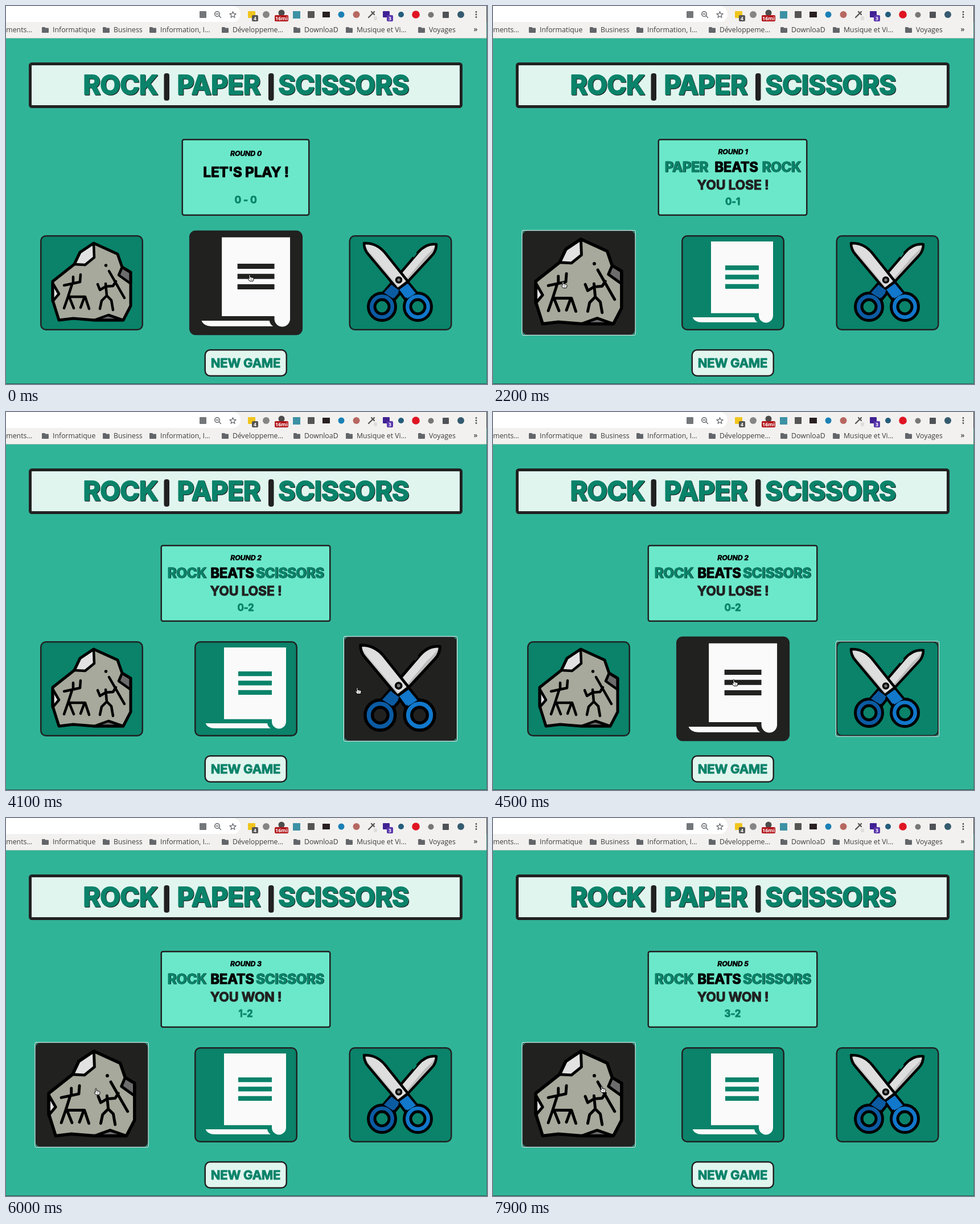
An HTML page with a canvas for the animation above (8 s loop, 845 px wide and 663 px high).

```html
<!DOCTYPE html>
<html lang="en">
<head>
<meta charset="utf-8">
<title>Rock Paper Scissors</title>
<style>
html, body { margin: 0; width: 100%; height: 100%; overflow: hidden; background: #30b498; }
canvas { display: block; }
</style>
</head>
<body>
<canvas id="stage" width="845" height="663"></canvas>
<script>
const ctx = document.getElementById('stage').getContext('2d');
const LOOP = 8000, FADE = 0.2;
const DARK = '#212121', GREEN = '#0a836a', BLACK = '#000', PALE = '#e1f5ef';

// Hover periods of each card, in seconds
const cards = [
  { x: 60, draw: rock, hover: [[1.85, 2.87], [5.285, 6.36], [7.38, 9]] },
  { x: 331, draw: paper, hover: [[-1, 1.64], [2.9, 3.072], [4.27, 5.24], [6.42, 7.22]] },
  { x: 602.5, draw: scissors, hover: [[3.15, 4.17]] }
];
// Pressed card and time of press; the panel follows 0.1 s later
const presses = [[2.1, 0], [3.5, 2], [4.6, 1], [5.6, 0], [6.7, 1], [7.8, 0]];
const panels = [
  { w: 225, round: 0 },
  { w: 263, round: 1, row: ['PAPER', 'BEATS', 'ROCK'], mid: 427.5, end: 'YOU LOSE !', score: '0-1' },
  { w: 299, round: 2, row: ['ROCK', 'BEATS', 'SCISSORS'], mid: 397.5, end: 'YOU LOSE !', score: '0-2' },
  { w: 237, round: 2, row: ['PAPER', 'VS.', 'PAPER'], mid: 421.5, end: 'TIE GAME !', score: '0-2' },
  { w: 299, round: 3, row: ['ROCK', 'BEATS', 'SCISSORS'], mid: 397.5, end: 'YOU WON !', score: '1-2' },
  { w: 263, round: 4, row: ['PAPER', 'BEATS', 'ROCK'], mid: 427.5, end: 'YOU WON !', score: '2-2' },
  { w: 299, round: 5, row: ['ROCK', 'BEATS', 'SCISSORS'], mid: 397.5, end: 'YOU WON !', score: '3-2' }
];
const pointer = [
  [0, 430, 477], [1.5, 430, 477], [1.7, 320, 482], [1.9, 200, 487], [2.1, 125, 489],
  [2.8, 125, 489], [2.9, 260, 484], [3.1, 529, 480], [3.25, 640, 486], [3.5, 619, 489],
  [4.1, 619, 489], [4.3, 500, 480], [4.5, 425, 475], [5.1, 425, 475], [5.2, 340, 478],
  [5.3, 248, 479], [5.5, 160, 480], [6.2, 160, 480], [6.4, 290, 470], [6.6, 415, 459],
  [6.7, 420, 458], [7.1, 420, 458], [7.2, 335, 464], [7.4, 230, 474], [7.6, 193, 476], [8, 193, 476]
];

const clamp = v => Math.max(0, Math.min(1, v));
const mix = (a, b, k) => a + (b - a) * k;

// CSS "ease"
function ease(x) {
  x = clamp(x);
  let lo = 0, hi = 1, u = 0.5;
  for (let i = 0; i < 16; i++) {
    u = (lo + hi) / 2;
    const v = 1 - u;
    if (0.75 * v * v * u + 0.75 * v * u * u + u * u * u < x) lo = u; else hi = u;
  }
  return 0.3 * (1 - u) * (1 - u) * u + 3 * (1 - u) * u * u + u * u * u;
}

function hoverAmount(card, t) {
  return Math.max(...card.hover.map(([a, b]) => ease((t - a) / FADE) * (1 - ease((t - b) / FADE))));
}

function paint(fill, stroke, width) {
  if (fill) { ctx.fillStyle = fill; ctx.fill(); }
  if (stroke) { ctx.strokeStyle = stroke; ctx.lineWidth = width; ctx.stroke(); }
}

function box(x, y, w, h, r, fill, stroke, line = 0) {
  ctx.beginPath();
  ctx.roundRect(x + line / 2, y + line / 2, w - line, h - line, r);
  paint(fill, stroke, line);
}

function disc(x, y, r, fill, stroke, line) {
  ctx.beginPath();
  ctx.arc(x, y, r, 0, 7);
  paint(fill, stroke, line);
}

function shape(d, fill, stroke, line) {
  const p = new Path2D(d);
  if (fill) { ctx.fillStyle = fill; ctx.fill(p); }
  if (stroke) { ctx.strokeStyle = stroke; ctx.lineWidth = line; ctx.stroke(p); }
}

// Bold lettering with rounded corners
function heading(s, x, y, size, color, { align = 'center', shadow = 0, italic = '' } = {}) {
  ctx.font = `${italic} 700 ${size}px Inter, sans-serif`;
  ctx.letterSpacing = `${-0.01 * size}px`;
  ctx.textAlign = align;
  ctx.lineWidth = size * 0.045;
  const put = (c, d) => {
    ctx.fillStyle = ctx.strokeStyle = c;
    ctx.strokeText(s, x + d, y + d);
    ctx.fillText(s, x + d, y + d);
  };
  if (shadow) put(DARK, shadow);
  put(color, 0);
  ctx.letterSpacing = '0px';
}

function label(s, x, y, size = 12.3, color = '#3c3c3c', align = 'left', weight = 400) {
  ctx.font = `${weight} ${size}px "Open Sans", "Noto Sans", sans-serif`;
  ctx.textAlign = align;
  ctx.fillStyle = color;
  ctx.fillText(s, x, y);
}

function browserBar() {
  box(0, 0, 845, 56, 0, '#f2f1ef');
  box(-30, 0, 442, 28, 14, '#fff');
  box(0, 56, 845, 1, 0, '#a3c4b9');

  box(340, 9, 12, 12, 1, '#74777a');
  disc(371, 14, 4.3, null, '#5f6368', 1.4);
  shape('M374 17L377.5 20.5M369 14H373', null, '#5f6368', 1.4);
  ctx.beginPath();
  for (let i = 0; i < 10; i++) {
    const a = i * Math.PI / 5 - Math.PI / 2, r = i % 2 ? 2.6 : 5.8;
    ctx.lineTo(398.5 + r * Math.cos(a), 15.5 + r * Math.sin(a));
  }
  ctx.closePath();
  paint(null, '#5f6368', 1.2);

  box(425, 9, 13, 12, 1, '#f0c51d');
  box(432, 16, 11, 11, 2, '#555');
  label('4', 437.5, 25, 8.5, '#fff', 'center', 700);
  disc(457, 15, 6, '#858585');
  disc(484, 12, 5.5, '#4c4c4c');
  box(472, 16, 24, 11, 2, '#b3161b');
  label('16mi', 484, 24.7, 9, '#fff', 'center', 700);
  box(504, 9, 13, 13, 0, '#3d91a5');
  box(530, 9, 12, 12, 1, '#555');
  box(556, 10, 13, 10, 0, '#292021');
  disc(589, 15, 5.5, '#1b80b5');
  disc(615.5, 15, 6, '#b76761');
  shape('M637 20L644 13M642 10L647 15M645 12L647 10', null, '#555', 2.3);
  box(646, 18, 6, 7, 2, '#ddd');
  box(662, 9, 12, 11, 1, '#402193');
  box(669, 16, 11, 11, 2, '#5936ad');
  label('3', 674.5, 25, 8.5, '#fff', 'center', 700);
  disc(694, 15, 5, '#245d7c');
  disc(720, 15, 6.8, '#e01423');
  disc(746.5, 15.5, 5, '#777');
  box(767, 10, 11, 11, 1, '#4f5256');
  disc(799, 15, 6, '#355b70');
  for (const y of [10.5, 15, 19.5]) disc(826, y, 1.4, '#4a4d51');

  label('ments…', 46, 46, 12.3, '#3c3c3c', 'right');
  const marks = [
    [63, 'Informatique'], [170, 'Business'], [252, 'Information, I…'], [379, 'Développeme…'],
    [505, 'DownloaD'], [597, 'Musique et Vi…'], [724, 'Voyages']
  ];
  for (const [x, name] of marks) {
    shape(`M${x} 38q0-1 1-1h4l1.5 1.5h4.5q1 0 1 1v6.5q0 1-1 1h-10q-1 0-1-1z`, '#626569');
    label(name, x + 19, 46);
  }
  label('»', 825, 45, 12.5, '#3c3c3c', 'center', 600);
}

function titleBox() {
  box(40, 99, 762, 80, 3, PALE, DARK, 5);
  for (const [s, x] of [['ROCK', 201], ['PAPER', 373.5], ['SCISSORS', 593]])
    heading(s, x, 155, 46, GREEN, { shadow: 1 });
  box(277.5, 118, 9.5, 48, 4, DARK);
  box(461, 118, 9.5, 48, 4, DARK);
}

function panel({ w, round, row, mid, end, score }) {
  const left = 421 - w / 2, right = left + w;
  box(left, 233, w, 135, 3, '#6be8ca', DARK, 2.5);
  heading('ROUND ' + round, 421.5, row ? 259.5 : 262.5, 12.3, BLACK, { italic: 'italic' });
  if (!row) {
    heading("LET'S PLAY !", 421.5, 300, 24.5, BLACK);
    heading('0 - 0', 421, 346, 17.5, GREEN);
    return;
  }
  heading(row[0], left + 12, 290.5, 24, GREEN, { align: 'left', shadow: 0.7 });
  heading(row[1], mid, 290.5, 24, BLACK);
  heading(row[2], right - 12, 290.5, 24, GREEN, { align: 'right', shadow: 0.7 });
  heading(end, 421.5, 322, 23, DARK);
  heading(score, 421, 349, 17, GREEN);
}

function rock() {
  const body = 'M154 416L196 435L204 458L219 467V526L206 551H155L118 548L93 551L82 516V483L120 453L130 432Z';
  const light = '#e1e2e1', shade = '#6c6c6c';
  shape(body, '#a6a99b');
  shape('M154 416L155 441L139 454L120 453L130 432Z', light, BLACK, 4.5);
  shape('M204 458L219 467V487L198 472Z', shade, BLACK, 4.5);
  shape('M82 486L93 505L82 518Z', light, BLACK, 4.5);
  shape('M155 551L180 542L206 551Z', shade, BLACK, 4.5);
  shape(body, null, BLACK, 5);
  shape('M102 490L116 487L130 484L131 471M118 475V486M116 488L109 510H139L146 531M109 510L102 530' +
    'M111 510L119 530M138 510L131 529', null, BLACK, 4.5);
  disc(175.5, 455, 2.7, BLACK);
  shape('M181 465L208 512M161 488L165 498L175 492L188 491L193 483M175 487L177 508L168 517L165 531' +
    'M177 508L185 516L188 533', null, BLACK, 4.5);
}

function paper(tint) {
  shape('M383 413H492V543A12.5 12.5 0 0 1 467 543V538.7H383Z', '#fafafa');
  shape('M350.5 546H459Q460 552 465 554.8H366Q354 554.5 350.5 546Z', '#fafafa');
  for (const y of [455, 471.2, 487.8]) box(408, y, 59, 8.2, 0, tint);
}

function ring(x, fill, tint) {
  disc(x, 527.5, 24, fill, BLACK, 5);
  disc(x, 527.5, 12.5, tint, BLACK, 5);
}

function scissors(tint) {
  const back = 'M756 418Q738 416 724 432L682 481L697 493L748 438Q756 430 756 418Z';
  const front = 'M629 416Q651 415 666 433L706 483L688 497L636 435Q629 427 629 416Z';
  const steel = '#dedede', navy = '#0b5ba3', blue = '#1178cb';
  shape(back, steel);
  shape('M756 418Q748 430 736 440L694 490L697 493L748 438Q756 430 756 418Z', '#bdbdbd');
  shape(back, null, BLACK, 4.5);
  shape('M678 485L660 506L682 516L697 498Z', navy, BLACK, 4.5);
  ring(660.5, navy, tint);
  shape(front, steel);
  shape('M629 416Q636 430 646 440L691 494L688 497L636 435Q629 427 629 416Z', '#c7c7c7');
  shape(front, null, BLACK, 4.5);
  shape('M706 484L724 506L702 516L688 497Z', blue, BLACK, 4.5);
  ring(723.5, blue, tint);
  shape('M706 487L720 504L705 513L692 497Z', blue);
  shape('M664 503L677 489L691 499L680 513Z', navy);
  disc(690, 480.5, 4.5, '#777', BLACK, 3.5);
  shape('M716 439L720 434', null, tint, 3);
}

function drawCard(card, t, focused) {
  const k = hoverAmount(card, t), cx = card.x + 90.5, cy = 485.5;
  const tint = `rgb(${mix(10, 33, k)},${mix(131, 33, k)},${mix(106, 32, k)})`;
  ctx.save();
  ctx.translate(cx, cy);
  ctx.scale(1 + k / 10, 1 + k / 10);
  ctx.translate(-cx, -cy);
  box(card.x, 402, 181, 167, 9, tint, DARK, 2.5);
  card.draw(tint);
  if (focused) {
    box(card.x + 0.5, 402.5, 180, 166, 2, null, '#18312c', 1);
    box(card.x - 0.4, 401.6, 181.8, 167.8, 2, null, '#fff', 0.9);
  }
  ctx.restore();
}

function drawPointer(t) {
  const i = Math.max(1, pointer.findIndex(p => p[0] >= t));
  const [a, b] = [pointer[i - 1], pointer[i]];
  const k = clamp((t - a[0]) / (b[0] - a[0]));
  const hand = cards.some(c => c.hover.some(([on, off]) => t >= on && t < off));
  ctx.save();
  ctx.translate(mix(a[1], b[1], k), mix(a[2], b[2], k));
  if (hand) {
    shape('M-3-5Q-2-6.5-1-5V-1.5L4-.5Q5.5 0 5 2L4 5.5H-2L-5 1.5Q-4.5 0-3 1Z', '#fff', BLACK, 1);
    shape('M0 1V3.5M2 1V3.5', null, '#444', 0.7);
  } else {
    shape('M-2-6V5L.5 2.8L2 6.5L3.8 5.7L2.2 2H5Z', '#fff', BLACK, 1);
  }
  ctx.restore();
}

function draw(t) {
  ctx.lineJoin = ctx.lineCap = 'round';
  box(0, 0, 845, 663, 0, '#30b498');
  browserBar();
  titleBox();
  panel(panels[presses.filter(p => t >= p[0] + 0.099).length]);
  const last = presses.filter(p => t >= p[0]).pop();
  cards.forEach((c, i) => drawCard(c, t, last && last[1] === i));
  box(348.5, 602, 145.5, 48, 9, PALE, DARK, 2.5);
  heading('NEW GAME', 421, 634, 22, GREEN);
  box(0, 662, 845, 1, 0, '#27594e');
  box(844, 0, 1, 663, 0, '#387d6e');
  box(844, 0, 1, 28, 0, '#44443f');
  drawPointer(t);
}

const start = performance.now();
function tick() {
  const ms = (performance.now() - start) % LOOP;
  draw(Math.floor(ms / 100) / 10);
  requestAnimationFrame(tick);
}
tick();
</script>
</body>
</html>
```
